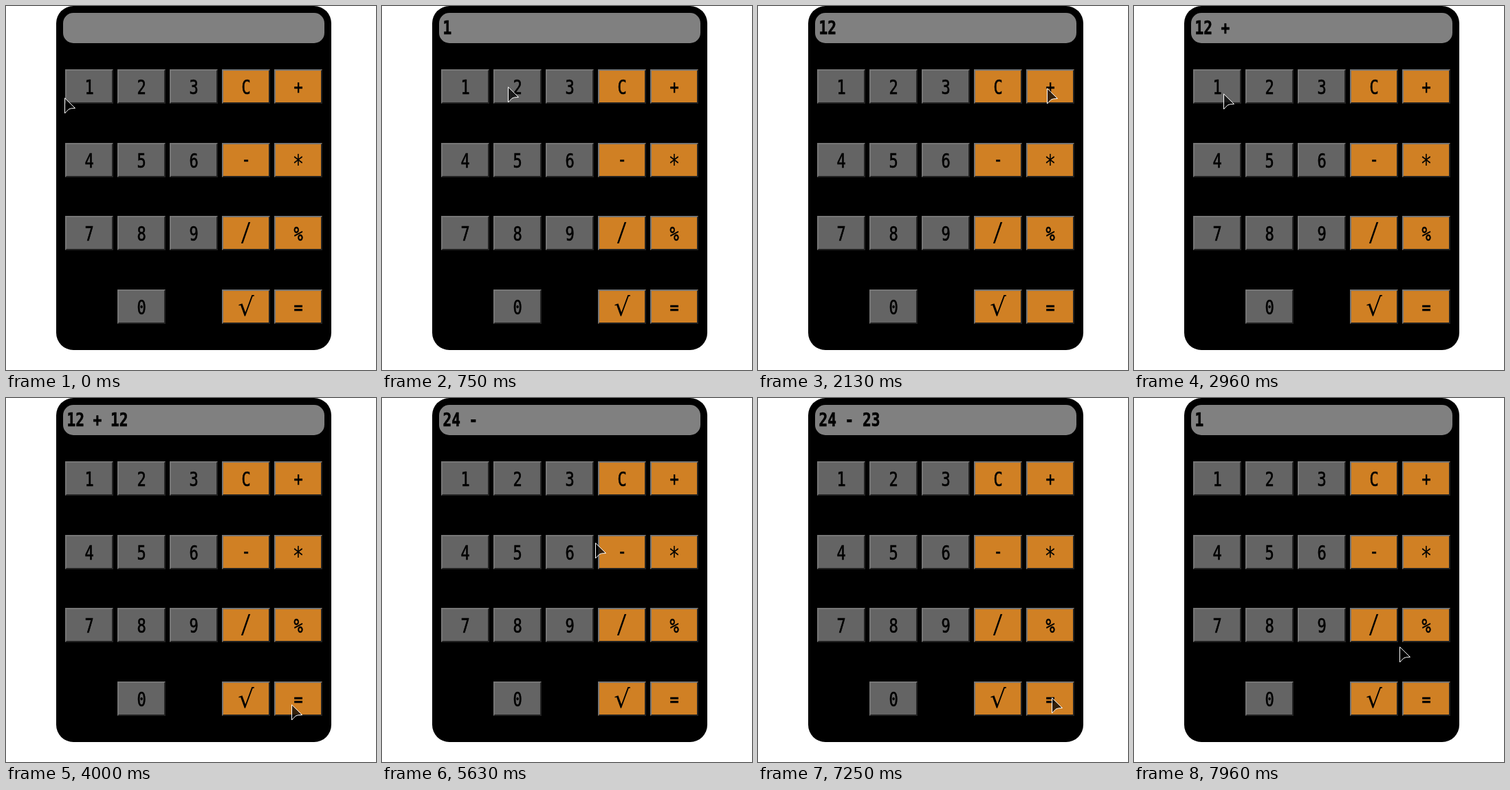
Animation, 538 px wide and 529 px high, one loop 8000 ms. Source, as an HTML page:

```html
<!DOCTYPE html>
<html lang="en">
<head>
<meta charset="utf-8">
<title>Calculator</title>
<style>
  html, body { margin: 0; width: 100%; height: 100%; overflow: hidden; background: #fff; }
  svg { display: block; }
  text { font-family: "DejaVu Sans Mono", "Liberation Mono", monospace; stroke: #000; stroke-width: .5px; }
  .key { font-size: 22px; text-anchor: middle; }
  .key.large { font-size: 28px; stroke: none; }
  .key.root { font: 37px "DejaVu Sans", sans-serif; stroke: none; }
  #readout { font-size: 21.1px; font-weight: bold; }
</style>
</head>
<body>
<svg width="538" height="529" viewBox="0 0 538 529">
  <rect x="73" width="400" height="500" rx="25"/>
  <rect x="83" y="10" width="380" height="44" rx="15" fill="#808080"/>
  <text id="readout" transform="translate(88.5 41) scale(1 1.3)"></text>
  <g id="keys"></g>
  <path id="cursor" d="M.5 .8V23L6 17.2Q8 15.5 15.5 15.5Z" fill-opacity=".75" stroke="#fff"/>
</svg>
<script>
const LOOP = 8000;
const DWELL = 170; // pause on a key before it is pressed
const $ = id => document.getElementById(id);

// Keypad: a space leaves the cell empty
const rows = ["123C+", "456-*", "789/%", " 0 √="];
const looks = {
  "/": { kind: "large" },
  "*": { kind: "large", drop: 8 },
  "-": { drop: -2 },
  "√": { kind: "root", drop: 2, tall: 1 }
};

function keyPlace(label) {
  const row = rows.findIndex(r => r.includes(label));
  return [86 + 76 * rows[row].indexOf(label), Math.round(92.2 + 106.6 * row)];
}

function keyMarkup(label) {
  const [x, y] = keyPlace(label);
  const { kind = "", drop = 0, tall = 1.3 } = looks[label] || {};
  return `<g transform="translate(${x} ${y})">
    <rect width="70" height="50" fill="${x > 300 ? "#d08024" : "#646464"}"/>
    <path d="M0 50V0H70L68 2H2V48Z" fill="#767676"/>
    <path d="M0 50H70V0L68 2V48H2Z" fill="#212121"/>
    <text class="key ${kind}" transform="translate(35 ${36 + drop}) scale(1 ${tall})">${label}</text>
  </g>`;
}

$("keys").innerHTML = [...rows.join("").replaceAll(" ", "")].map(keyMarkup).join("");

// Each visit: key, time of press, spot within the key, bend of the way there
const visits = [
  { key: "1", at: 580, spot: [37, 20], leave: 250 },
  { key: "2", at: 1000, spot: [28, 26] },
  { key: "+", at: 2290, spot: [30, 27], bend: [90, 309] },
  { key: "1", at: 3250, spot: [37, 30], bend: [0, 106] },
  { key: "2", at: 3580, spot: [42, 29] },
  { key: "=", at: 4210, spot: [24, 35], bend: [180, 0] },
  { key: "-", at: 5420, spot: [38, 28], leave: 4750 },
  { key: "2", at: 6210, spot: [46, 26], bend: [79, 90] },
  { key: "3", at: 6710, spot: [16, 25] },
  { key: "=", at: 7500, spot: [40, 26], bend: [0, 80] },
  { key: "%", at: 8130, spot: [-4, 56], bend: [70, 0] }
];

// Join the visits into one journey
let last = { at: 0, to: [85, 133] };
for (const v of visits) {
  const place = keyPlace(v.key);
  v.from = last.to;
  v.to = v.spot.map((s, i) => place[i] + s);
  v.leave ??= last.at;
  v.bend ??= [0, 0];
  last = v;
}

function pointer(t) {
  const { from, to, bend, leave, at } = visits.findLast(v => v.leave <= t) || visits[0];
  const p = Math.min(1, Math.max(0, (t - leave) / (at - DWELL - leave)));
  const u = 1 - (1 - p) ** 2;
  return from.map((a, i) => Math.round(a + (to[i] - a) * u + 2 * u * (1 - u) * bend[i]));
}

function press(text, key) {
  if (key === "=") {
    const [a, op, b] = text.split(" ");
    return String(op === "+" ? +a + +b : a - b);
  }
  return /\d/.test(key) ? text + key : `${text} ${key} `;
}

function draw(now) {
  const t = now % LOOP;
  $("readout").textContent = visits.filter(v => v.at <= t).reduce((text, v) => press(text, v.key), "");
  $("cursor").setAttribute("transform", `translate(${pointer(t)})`);
  requestAnimationFrame(() => draw(performance.now() - start));
}

const start = performance.now();
draw(0);
</script>
</body>
</html>
```
